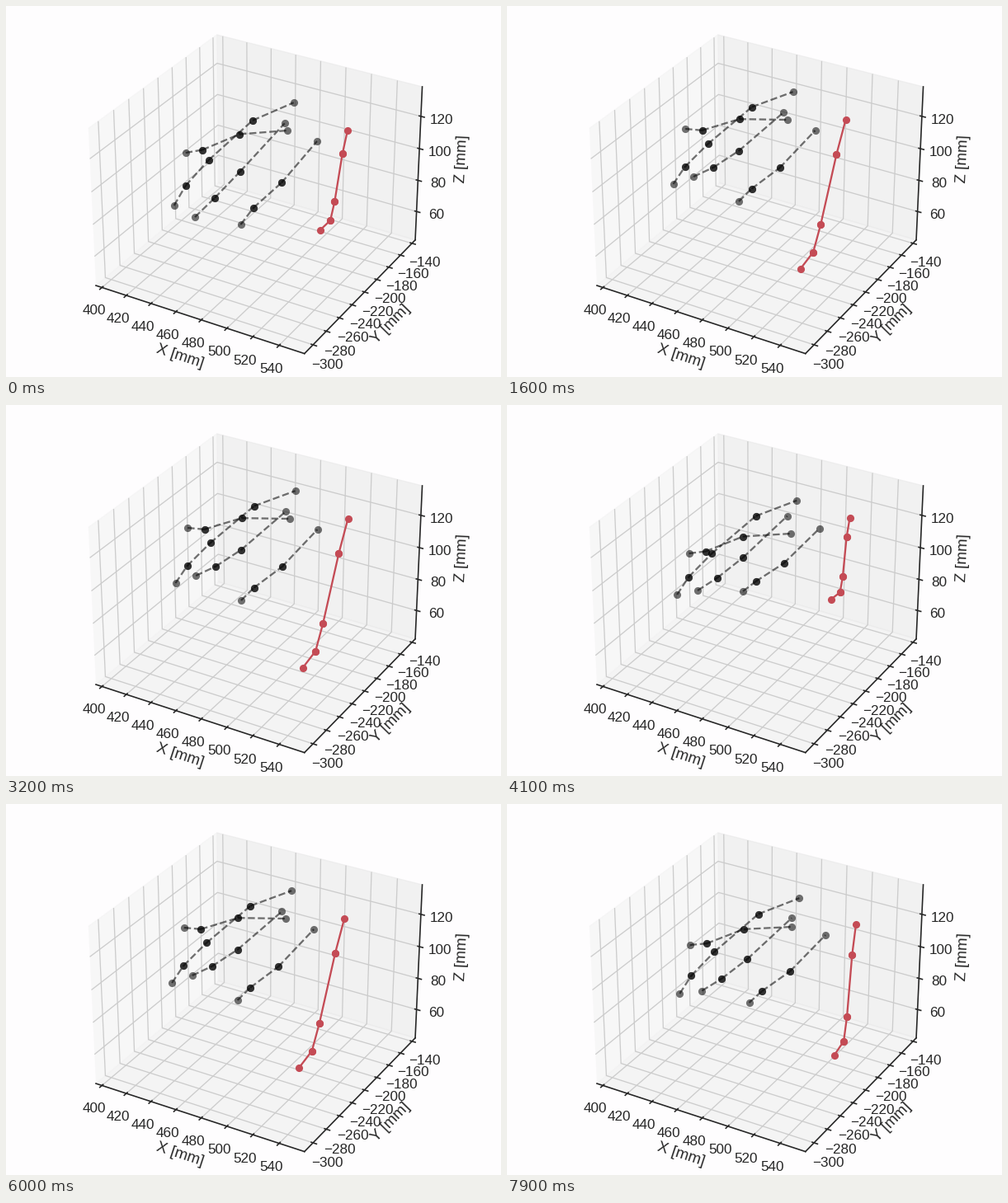
A matplotlib script for the animation above (8000 ms loop, 600 px wide and 450 px high).

```python
import numpy as np
import matplotlib.pyplot as plt
from matplotlib.animation import FuncAnimation

W, H = 600, 450
FRAMES, INTERVAL = 80, 100
PERIOD = 54
INK, RED = "0.15", "#c44b55"

plt.rcParams.update({
    "font.family": "Liberation Sans",
    "text.color": INK, "axes.labelcolor": INK,
    "axes.edgecolor": INK, "axes.linewidth": 1.25,
    "axes.labelsize": 14.4, "grid.color": "0.8", "grid.linewidth": 1,
    "xtick.color": INK, "ytick.color": INK,
    "xtick.labelsize": 13.2, "ytick.labelsize": 13.2,
    "xtick.major.width": 1.25, "ytick.major.width": 1.25,
})


def chain(*xy):
    return np.array(xy, float).reshape(-1, 2)


# The curled hand, each chain from tip to base in stage pixels.
FINGERS = [
    chain(222.7, 181, 243, 178.5, 288, 160.5, 346, 157),
    chain(208.7, 235, 222.7, 213, 250.7, 184, 304, 138, 353.7, 118.5),
    chain(234, 231, 258, 215, 289, 190, 342.7, 139),
    chain(289.5, 235, 305, 222, 339, 199, 382, 156),
]
THUMB = chain(386.5, 243, 399, 234, 404, 215, 413, 166.5, 419, 143)


def arc(points):
    """Share of the chain's length passed at each joint."""
    steps = np.hypot(*np.diff(points, axis=0).T)
    return np.concatenate([[0], np.cumsum(steps)]) / steps.sum()


def blend(points, k, tip, base):
    k = k[:, None]
    return points + (1 - k) * tip + k * base


def pose(tips=(0, 0, 0, 0), bases=(0, 0), sway=(0, 0), thumb=(0, 0)):
    """Offset the curled hand.

    tips: dy of each fingertip; bases and sway: dy of the knuckles and dx,
    spread evenly from the first finger to the last; thumb: offset of its tip.
    """
    chains = []
    for finger, tip, base, dx in zip(FINGERS, tips, np.linspace(*bases, 4),
                                     np.linspace(*sway, 4)):
        k = np.linspace(0, 1, len(finger))
        chains.append(blend(finger, k, np.array([dx, tip]),
                            np.array([dx, base])))
    root = np.array([sway[1], bases[1]])
    chains.append(blend(THUMB, arc(THUMB), np.array(thumb), root))
    return np.concatenate(chains)


CURLED = pose()
TUCKED = pose((-1, -5, -6, -9), (-1, -6), (-2, -3.5), (6, -7))
LOWERED = pose((-3, 7, 25, 30), (-6, 8), (-5, -5), (-6, 29))
LIFTED = pose((-32, -19, -24, 2), (-19, -5), (-6.5, -8.5), (-31, 76))
SPREAD = pose((-11, -11, -14, 23), (-6, 4.5), (-1, 6), (-41, 82))
OPENING = pose((-10, -5, -4.5, 6), (-8, 3), (-1, 4), (10, 62))

# Time in frames, pose, drift of the whole hand.
KEYS = [
    (0, LOWERED, (0, 0)), (4, LIFTED, (0, 1)), (13, LIFTED, (-3, 1)),
    (16, LIFTED, (0, 0)), (19, LIFTED, (2, 2)), (22, CURLED, (0, 0)),
    (24, CURLED, (0, 0)), (25, OPENING, (0, 0)), (26, SPREAD, (4, 3)),
    (28, SPREAD, (2, 8)), (32, LIFTED, (4, 0)), (36, SPREAD, (0, 1)),
    (39, TUCKED, (0, 0)), (41, TUCKED, (0, 0)), (45, SPREAD, (0, 1)),
    (48, LIFTED, (5, 1)), (52, SPREAD, (0, 0)), (PERIOD, SPREAD, (0, 0)),
]


def joints_at(t):
    for (t0, a, da), (t1, b, db) in zip(KEYS, KEYS[1:]):
        if t0 <= t < t1:
            k = (t - t0) / (t1 - t0)
            k = k * k * (3 - 2 * k)
            return (1 - k) * (a + da) + k * (b + db)


fig = plt.figure(figsize=(6.4, 4.8), dpi=W / 6.4, facecolor="#fefdfe")

box = fig.add_axes([0, 0, 1, 1], projection="3d", facecolor="none")
box.set(xlim=(395.0, 559.0), ylim=(-312.7, -134.3), zlim=(41.4, 138.0),
        xticks=range(400, 541, 20), yticks=range(-300, -139, 20),
        zticks=range(60, 121, 20),
        xlabel="X [mm]", ylabel="Y [mm]", zlabel="Z [mm]")
box.view_init(elev=30, azim=-60)

stage = fig.add_axes([0, 0, 1, 1], zorder=5)
stage.set(xlim=(0, W), ylim=(H, 0))
stage.axis("off")

# One line per bone: shared translucent joints add up to a darker dot.
bones = []
first = 0
for points in FINGERS + [THUMB]:
    style = (dict(color=RED, ls="-") if points is THUMB
             else dict(color="k", ls="--", alpha=0.55))
    for j in range(first, first + len(points) - 1):
        line, = stage.plot([], [], marker="o", ms=7, mew=0, lw=1.75, **style)
        bones.append((line, j))
    first += len(points)


def update(i):
    joints = joints_at(i % PERIOD)
    for line, j in bones:
        line.set_data(*joints[j:j + 2].T)
    return [line for line, _ in bones]


anim = FuncAnimation(fig, update, frames=FRAMES, interval=INTERVAL,
                     repeat=True, repeat_delay=0, blit=False)
plt.show()
```
